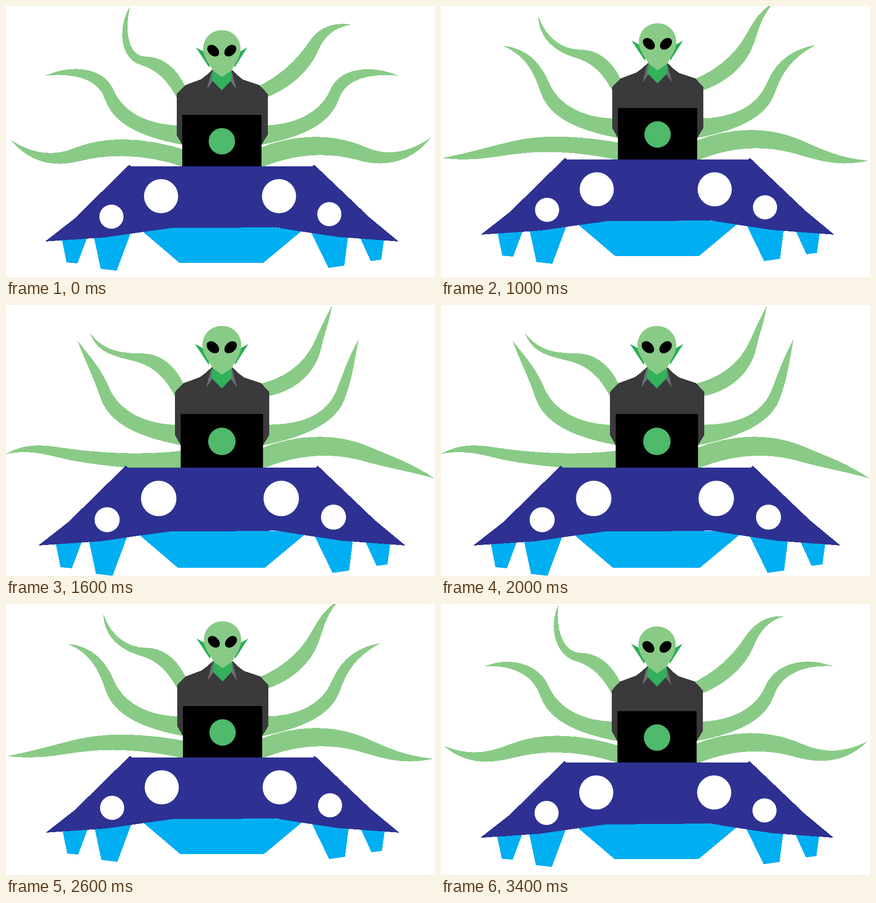
Recreate the animation shown at these times as an HTML page. Size 942 by 595 pixels, loop 3600 ms.

```html
<!DOCTYPE html>
<html lang="en">
<head>
<meta charset="utf-8">
<title>Flying alien</title>
<style>
  html, body { margin: 0; width: 100%; height: 100%; overflow: hidden; background: #fff; }
  svg { display: block; width: 942px; height: 595px; }
  .skin { fill: #89cb86; }
  .ear { fill: #2bae57; }
  .neck { fill: #33b15c; }
  .suit { fill: #3a3a3c; }
  .collar { fill: #6d6e71; }
  .hull { fill: #2e3192; }
  .jet { fill: #00aef2; }
  .window { fill: #fff; }
  #arms, .suit, .hull, .jet { shape-rendering: crispEdges; }
</style>
</head>
<body>
<svg viewBox="0 0 942 595">
  <g id="scene">
    <g id="arms" class="skin"></g>
    <path class="suit" d="M454 139L441 151 428 161 393 174 374.500 193V283L387 305H561L574.500 283V193L557 174 521 162 508 152 497 141Z"/>
    <path class="ear" d="M417 91L436 101 448 128 446 135ZM530 91L512 101 501 128 502 135Z"/>
    <path class="collar" d="M452 141L441 183 454 165ZM495 141L506 183 493 165Z"/>
    <path class="neck" d="M454 140H495V163L474 185 452 163Z"/>
    <path class="skin" d="M474 53C498 53 515 71 515 94C515 112 503 126 495 142L474 156 455 142C446 126 433 112 433 94C433 71 450 53 474 53Z"/>
    <ellipse rx="15" ry="10.500" transform="translate(455 98) rotate(43)"/>
    <ellipse rx="15" ry="10.500" transform="translate(492.500 98) rotate(-43)"/>
    <path d="M387 239H561V353H387Z"/>
    <circle cx="474" cy="297" r="29" fill="#4fb96c"/>
    <path class="jet" d="M301 496L363 486H588L649 494 565 564H381ZM123 514L178 509 157 565 133 563ZM193 507L274 498 243 581 208 577ZM670 497L751 506 743 570 708 575ZM778 510L830 513 824 557 801 560Z"/>
    <path class="hull" d="M86 517L150 467 268 351 271 348.500 275 352H673L676 348.500 680 351.500 798 464 862 517 728 507 648 495 588 485.500 480 487 363 487.500 301 496 218 508Z"/>
    <g class="window">
      <circle cx="340.500" cy="417.500" r="37.500"/>
      <circle cx="599.500" cy="417.500" r="37.500"/>
      <circle cx="231.500" cy="462.500" r="26.500"/>
      <circle cx="710" cy="457" r="26.500"/>
    </g>
  </g>
</svg>
<script>
const STEP = 200, LAST = 9;
const CENTER = 474, PIVOT = 233;
const SPREAD = 9; // degrees between the tip direction and each edge

const clamp = v => Math.min(1, Math.max(0, v));
const smooth = v => clamp(v) ** 2 * (3 - 2 * clamp(v));
const bump = v => Math.sin(Math.PI * clamp(v));
const mix = (a, b, t) => a.map((v, i) => v + (b[i] - v) * t);
const arc = ([a, b, c], t) => mix(mix(a, b, t), mix(b, c, t), t);
const mirror = root => root.map(edge => edge.map(([x, y]) => [2 * CENTER - x, y]));

const middle = [
  [[392, 262], [318, 264], [258, 236], [236, 184]],
  [[394, 306], [288, 287], [234, 255], [217, 204]]
];

// root: both edges from the body outwards, drifting towards rootTo.
// tip: x, y and direction along a quadratic curve.
const arms = [
  {
    side: -1,
    root: [
      [[396, 182], [374, 130], [338, 111], [306, 111]],
      [[380, 212], [357, 163], [330, 139], [295, 129]]
    ],
    tip: [[273, 0, -66], [200, 25, -98], [193, 80, -124]]
  },
  {
    side: -1,
    root: middle,
    tip: [[86, 153, 165], [125, 96, 165], [181, 80, 260]]
  },
  {
    side: -1,
    root: [
      [[400, 318], [320, 292], [230, 280], [150, 312]],
      [[395, 355], [310, 325], [230, 323], [160, 341]]
    ],
    rootTo: [
      [[402, 314], [326, 338], [240, 338], [162, 314]],
      [[402, 357], [297, 368], [220, 358], [162, 337]]
    ],
    tip: [[11, 295, 221], [-17, 397, 175], [25, 306, 155]]
  },
  {
    side: 1,
    root: [
      [[550, 178], [600, 155], [640, 118], [666, 78]],
      [[566, 203], [615, 185], [665, 148], [686, 97]]
    ],
    rootTo: [
      [[550, 176], [600, 169], [650, 146], [674, 83]],
      [[566, 202], [621, 198], [674, 163], [684, 98]]
    ],
    tip: [[759, 41, 1], [737, -11, -30], [698, 14, -85]]
  },
  {
    side: 1,
    root: mirror(middle),
    rootTo: [
      [[555, 261], [640, 265], [697, 246], [719, 188]],
      [[555, 307], [655, 287], [716, 256], [734, 210]]
    ],
    tip: [[862, 153, 14], [857, 95, 14], [738, 76, -93]]
  },
  {
    side: 1,
    root: [
      [[550, 314], [630, 281], [715, 277], [790, 310]],
      [[555, 357], [640, 320], [715, 322], [775, 339]]
    ],
    tip: [[933, 289, -43], [951, 366, -10], [917, 379, 34]]
  }
];

const scene = document.getElementById('scene');
const group = document.getElementById('arms');
for (const arm of arms) {
  arm.path = group.appendChild(document.createElementNS('http://www.w3.org/2000/svg', 'path'));
}

// Point at a given length from p, in the direction of angle (radians).
const reach = ([x, y], angle, length) => [x + length * Math.cos(angle), y + length * Math.sin(angle)];

// Carries a root edge smoothly on to the tip.
function extend(edge, tip, degrees) {
  const [from, end] = edge.slice(-2);
  const gap = Math.hypot(tip[0] - end[0], tip[1] - end[1]);
  const leave = Math.atan2(end[1] - from[1], end[0] - from[0]);
  const arrive = degrees * Math.PI / 180;
  return [...edge, reach(end, leave, gap * 0.35), reach(tip, arrive, -gap * 0.42), tip];
}

function shape({ side, root, rootTo = root, tip }, t) {
  const [x, y, angle] = arc(tip, t);
  const [near, far] = root.map((edge, e) => {
    const base = edge.map((p, i) => mix(p, rootTo[e][i], t ** 2.5));
    return extend(base, [x, y], angle + side * SPREAD * (e ? -1 : 1));
  });
  const [start, ...rest] = [...near, ...far.reverse().slice(1)]
    .map(p => p.map(v => v.toFixed(2)).join(' '));
  return `M${start}C${rest.join(' ')}Z`;
}

let shown = -1;

function draw(step) {
  const scale = 1 + 0.046 * smooth((step - 5) / 4);
  const hop = 6 * bump((step - 6) / 2) - 21 * bump((step / 6) ** 1.6);
  const x = CENTER * (1 - scale) - hop * 0.1;
  const y = PIVOT * (1 - scale) + hop;
  scene.setAttribute('transform', `translate(${x} ${y}) scale(${scale})`);
  for (const arm of arms) arm.path.setAttribute('d', shape(arm, step / LAST));
  shown = step;
}

// The poses run forwards, then backwards.
function tick() {
  const n = Math.floor(performance.now() / STEP) % (2 * LAST);
  const step = Math.min(n, 2 * LAST - n);
  if (step !== shown) draw(step);
  requestAnimationFrame(tick);
}

tick();
</script>
</body>
</html>
```
